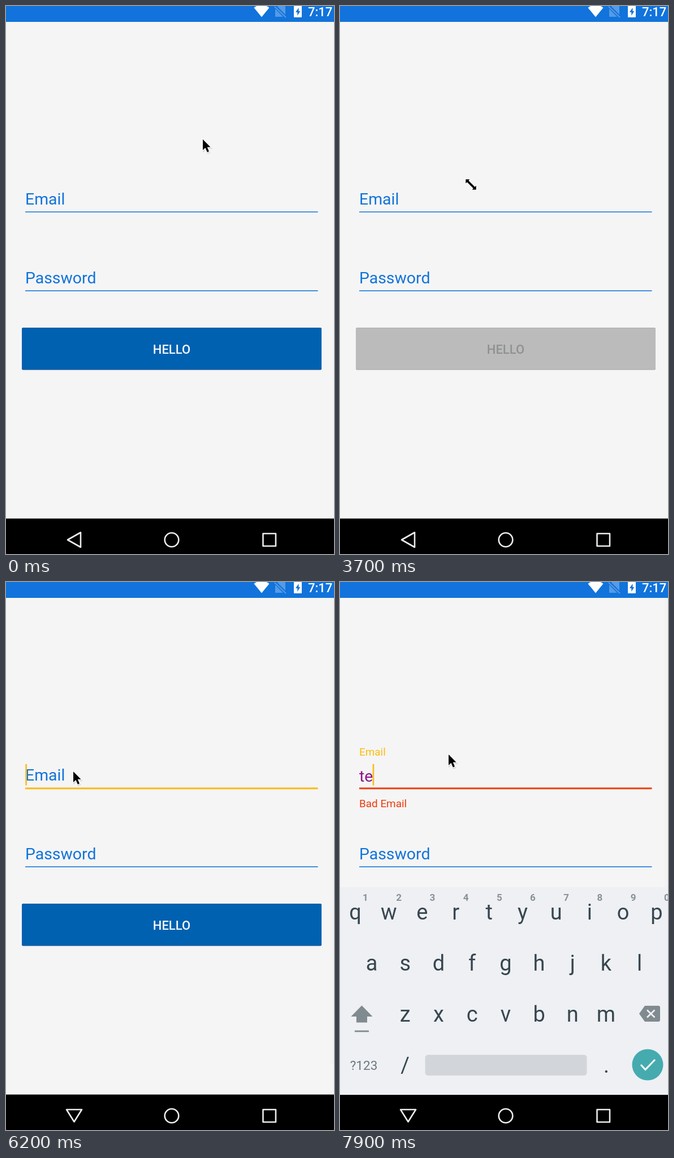
Recreate the animation shown at these times as an HTML page. Size 580 by 966 pixels, loop 8000 ms.

```html
<!DOCTYPE html>
<html lang="en">
<head>
<meta charset="utf-8">
<title>Login form</title>
<style>
  html, body { margin: 0; width: 100%; height: 100%; overflow: hidden; background: #f5f5f5; }
  svg { display: block; width: 100%; height: 100%; }
  text { font-family: Roboto, Arial, sans-serif; white-space: pre; }
  .medium { font-weight: 500; }
  .mid { text-anchor: middle; }
  .field { font-size: 28.4px; fill: #1173db; }
  .key { font-size: 38px; fill: #37474f; }
  .digit { font-size: 17px; font-weight: 700; fill: #889196; }
</style>
</head>
<body>
<svg viewBox="0 0 580 966">
  <rect width="580" height="966" fill="#f5f5f5"/>
  <rect id="edge" x="574" y="28" width="6" height="822" fill="#000" opacity=".012"/>

  <rect width="580" height="28" fill="#1173db"/>
  <path d="M438.5 3Q452-7 465.5 3L452 19.5Z" fill="#fff"/>
  <g fill="#559be6">
    <path d="M481 0H494V15L480 1ZM476 5V19H490Z"/>
    <path d="M475 1L495 20" stroke="#559be6" stroke-width="2"/>
  </g>
  <rect x="509" y="-2" width="14" height="22" rx="1" fill="#fff"/>
  <path d="M517.5 3L512 11H515.3V17L520.3 9H517.5Z" fill="#1173db"/>
  <text class="medium" x="534" y="18" font-size="22" fill="#fff">7:17</text>

  <text id="label" x="34" class="field">Email</text>
  <rect id="line" x="34" width="517.5"/>
  <text id="typed" x="34" y="352" font-size="28.4" fill="#8b1589"></text>
  <rect id="caret" y="321" width="2.6" height="37.5" fill="#fcbb12"/>
  <text id="error" x="34" y="397" font-size="18.9" fill="#ee3a0c">Bad Email</text>

  <text x="34" y="489" class="field">Password</text>
  <rect x="34" y="501" width="517.5" height="2" fill="#4390e2"/>

  <rect id="shade" x="28" y="567" width="530" height="74.5" rx="2"/>
  <rect id="button" x="28" y="568" width="530" height="72" rx="2"/>
  <text id="hello" class="medium mid" x="293" y="613" font-size="22">HELLO</text>

  <rect y="903.5" width="580" height="63" fill="#000"/>
  <g fill="none" stroke="#ececec" stroke-width="2.6" stroke-linejoin="round">
    <path id="back"/>
    <circle cx="293" cy="941" r="12.3"/>
    <rect x="454.5" y="930" width="22.5" height="22"/>
  </g>

  <g id="board">
    <rect y="538" width="580" height="366" fill="#eef0f4"/>
    <g id="keys"></g>
    <g fill="#808b90">
      <path d="M38.5 746.5L57.5 766H48V776.5H29V766H19.5Z"/>
      <rect x="26" y="790.5" width="25" height="2.8"/>
      <path d="M539 747H563Q566 747 566 750V772Q566 775 563 775H539L529 761Z"/>
    </g>
    <path d="M543 754.5L556.5 767.5M556.5 754.5L543 767.5" stroke="#eef0f4" stroke-width="2.8"/>
    <text class="mid" x="42" y="860" font-size="22.5" fill="#6c777d">?123</text>
    <rect x="150.5" y="833.5" width="286" height="36.5" rx="5" fill="#d2d5d9"/>
    <circle cx="544" cy="851" r="27.5" fill="#45abaf"/>
    <path d="M532 851L540 859.5L557 842" fill="none" stroke="#fff" stroke-width="3"/>
  </g>

  <g id="pointer">
    <path d="M0 0V19L4.5 15L7.8 22.7L11 21.3L7.8 13.8H13.6Z" transform="translate(1 2)" fill="#000" stroke="#000" stroke-width="2" opacity=".13"/>
    <path d="M0 0V19L4.5 15L7.8 22.7L11 21.3L7.8 13.8H13.6Z" fill="#000" stroke="#fff" stroke-width="2.4" paint-order="stroke" stroke-linejoin="round"/>
  </g>
  <path id="resize" d="M-9.2-9.2H-2L-4.2-6.8L6.8 4.2L9.2 2V9.2H2L4.2 6.8L-6.8-4.2L-9.2-2Z" fill="#000" stroke="#fff" stroke-width="2" paint-order="stroke"/>
</svg>
<script>
  const LOOP = 8000, STEP = 100;
  const FOCUS = 6200, TYPE_T = 7100, TYPE_E = 7500;
  const el = {};
  document.querySelectorAll('[id]').forEach(n => el[n.id] = n);

  const set = (node, attrs) => {
    for (const k in attrs) node.setAttribute(k, attrs[k]);
  };
  const show = (node, on) => set(node, { visibility: on ? 'visible' : 'hidden' });
  const clamp = x => Math.max(0, Math.min(1, x));
  const mix = (a, b, p) => a + (b - a) * p;
  const blend = (a, b, p) => `rgb(${a.map((v, i) => Math.round(mix(v, b[i], p)))})`;

  // Keyboard letters: [characters, first centre, baseline]
  const PITCH = 59.2;
  const addKey = (cls, x, y, ch) => {
    const t = document.createElementNS('http://www.w3.org/2000/svg', 'text');
    set(t, { class: cls + ' mid', x, y });
    t.textContent = ch;
    el.keys.append(t);
  };
  [['qwertyuiop', 27, 595], ['asdfghjkl', 56, 685], ['zxcvbnm', 115.3, 775]].forEach(([row, x, y]) =>
    [...row].forEach((ch, i) => addKey('key', x + i * PITCH, y, ch)));
  [...'1234567890'].forEach((ch, i) => addKey('digit', 45 + i * PITCH, 562, ch));
  addKey('key', 115, 865, '/');
  addKey('key', 471, 865, '.');

  // Pointer path: [time, x, y]
  const path = [
    [0, 348, 235], [900, 339, 242], [1600, 334, 246], [2500, 334, 246],
    [2800, 264.5, 287.5], [2900, 264.5, 287.5], [3200, 250, 300], [3500, 250, 300],
    [4100, 194.5, 344], [4400, 215, 262], [4700, 218, 252], [5300, 138, 342],
    [5400, 136, 344], [6200, 119, 334], [6800, 119, 334], [7000, 125, 331],
    [7800, 192, 304], [8000, 192, 304]
  ];
  const pointAt = t => {
    const i = path.findIndex(p => p[0] > t);
    const a = path[i - 1], b = path[i];
    const p = (t - a[0]) / (b[0] - a[0]);
    return [mix(a[1], b[1], p), mix(a[2], b[2], p)];
  };

  const BLUE = [17, 115, 219], AMBER = [252, 187, 18];

  function drawField(t) {
    const focused = t >= FOCUS, bad = t >= TYPE_T;
    const p = clamp((t - FOCUS) / 200);
    set(el.label, { y: mix(350, 306, p ** 1.3) });
    el.label.style.fontSize = mix(28.4, 18.9, 1 - (1 - p) ** 3.5) + 'px';
    el.label.style.fill = blend(BLUE, AMBER, p ** 0.6);
    set(el.line, {
      y: focused ? 362.3 : 362,
      height: focused ? 3 : 2,
      fill: bad ? '#f23d0c' : focused ? '#fcbb12' : '#4a95e4'
    });
    const text = t >= TYPE_E ? 'te' : bad ? 't' : '';
    if (el.typed.textContent !== text) el.typed.textContent = text;
    const last = t >= TYPE_E ? TYPE_E : bad ? TYPE_T : FOCUS;
    set(el.caret, { x: 34.3 + (text ? el.typed.getComputedTextLength() - 1 : 0) });
    show(el.caret, focused && (t - last) % 1000 < 500);
    set(el.error, { opacity: clamp((t - TYPE_T) / 200) });
  }

  function drawButton(t) {
    const off = t >= 2200 && t < 3800;
    set(el.button, { fill: off ? '#bbbbbb' : '#0061b1' });
    set(el.shade, { fill: off ? '#adadad' : '#0b5698' });
    set(el.hello, { fill: off ? '#8f9192' : '#f5f8fb' });
  }

  function drawKeyboard(t) {
    const k = clamp((t - FOCUS) / 200);
    set(el.board, {
      opacity: 1 - (1 - k) ** 2.6,
      transform: `translate(0 ${52 * (1 - k) ** 2})`
    });
    show(el.board, k > 0);
    set(el.back, { d: t >= FOCUS ? 'M107 930H134L120.5 951.5Z' : 'M109 941L132 928V954Z' });
  }

  function drawPointer(t) {
    const [x, y] = pointAt(t), resizing = t >= 2700 && t < 4400;
    const at = { transform: `translate(${x} ${y})` };
    set(el.pointer, at);
    set(el.resize, at);
    show(el.pointer, !resizing);
    show(el.resize, resizing);
  }

  function draw(now) {
    const t = Math.floor(((now + 4) % LOOP) / STEP) * STEP;
    drawField(t);
    drawButton(t);
    drawKeyboard(t);
    drawPointer(t);
    show(el.edge, t >= 5400);
  }

  const start = performance.now();
  const tick = () => {
    draw(performance.now() - start);
    requestAnimationFrame(tick);
  };
  tick();
</script>
</body>
</html>
```
